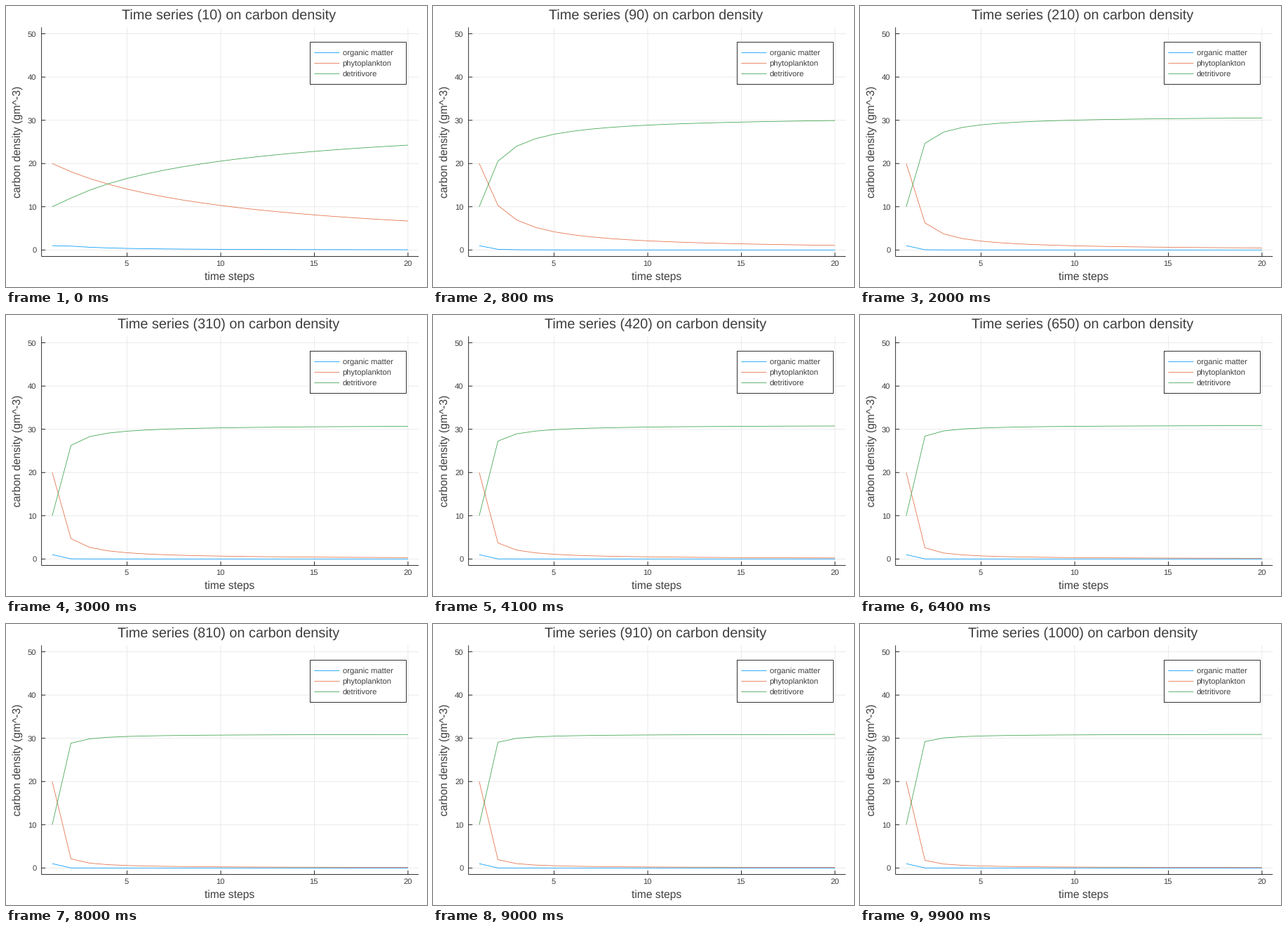
Recreate the animation shown at these times as a matplotlib script. Size 600 by 400 pixels, loop 10 s.

```python
import matplotlib.pyplot as plt
import numpy as np
from matplotlib.animation import FuncAnimation
from matplotlib.patches import Rectangle

W, H, DPI = 600, 400, 100
PX = 72 / DPI  # points per pixel
STROKE = 0.8 * PX
FRAMES, SAMPLES = 100, 20
INK, AXIS, GRID = "#3e3e3e", "black", "#e6e6e6"
SERIES = [
    ("organic matter", "#009afa"),
    ("phytoplankton", "#e36f47"),
    ("detritivore", "#3da44d"),
]
LEFT, RIGHT, TOP, BOTTOM = 50.7, 588.2, 30.4, 356.5

plt.rcParams["font.family"] = "Liberation Sans"
plt.rcParams["text.hinting"] = "no_hinting"


def simulate(steps, death=0.00052, uptake=0.0185):
    """Carbon moves from phytoplankton through organic matter to detritivores."""
    state = np.empty((steps + 1, 3))
    matter, phyto, detri = state[0] = 1.0, 20.0, 10.0
    for i in range(1, steps + 1):
        dead = death * phyto * phyto
        eaten = uptake * detri * matter
        matter += dead - eaten
        phyto -= dead
        detri += eaten
        state[i] = matter, phyto, detri
    return state


def px(step):
    return 65.9 + (step - 1) * 26.685


def py(value):
    return 347.3 - value * 6.154


fig = plt.figure(figsize=(W / DPI, H / DPI), dpi=DPI, facecolor="white")
ax = fig.add_axes([0, 0, 1, 1])
ax.set_xlim(0, W)
ax.set_ylim(H, 0)
ax.axis("off")


def line(xs, ys, color, z=2):
    return ax.plot(xs, ys, color=color, lw=STROKE, zorder=z, snap=False,
                   solid_capstyle="butt")[0]


def label(x, y, text, size, ha="center", **kw):
    return ax.text(x, y, text, fontsize=size * PX, color=INK, ha=ha,
                   va="baseline", zorder=6, **kw)


for step in (5, 10, 15, 20):
    x = px(step)
    line([x, x], [TOP, BOTTOM], GRID, 1)
    line([x, x], [BOTTOM, BOTTOM - 5.5], AXIS)
    label(x - 0.7, 370, str(step), 11.3)
for value in range(0, 51, 10):
    y = py(value)
    line([LEFT, RIGHT], [y, y], GRID, 1)
    line([LEFT, LEFT + 5.5], [y, y], AXIS)
    label(43.5, y + 4, str(value), 11.3, "right")
line([LEFT, LEFT], [TOP, BOTTOM], AXIS)
line([LEFT, RIGHT], [BOTTOM, BOTTOM], AXIS)

label(318.4, 390, "time steps", 15.6)
label(21, 193, "carbon density (gm^-3)", 15.6, rotation=90,
      rotation_mode="anchor")
title = label(317.6, 19, "", 19.85)

ax.add_patch(Rectangle((433.4, 51.5), 137, 60, fc="white", ec=AXIS,
                       lw=STROKE, snap=False, zorder=4))
for row, (name, color) in enumerate(SERIES):
    y = 66.5 + 15 * row
    line([439.3, 475.3], [y, y], color, 5)
    label(479.6, y + 4.5, name, 11.25, "left")

steps = np.arange(1, SAMPLES + 1)
states = simulate(10 * FRAMES * (SAMPLES - 1))
curves = [line(px(steps), py(0 * steps), color, 3) for _, color in SERIES]


def update(frame):
    stride = 10 * (frame + 1)
    title.set_text(f"Time series ({stride}) on carbon density")
    for curve, values in zip(curves, states[(steps - 1) * stride].T):
        curve.set_ydata(py(values))
    return [title, *curves]


anim = FuncAnimation(fig, update, frames=FRAMES, interval=100, repeat=True,
                     repeat_delay=0, blit=False)
plt.show()
```
